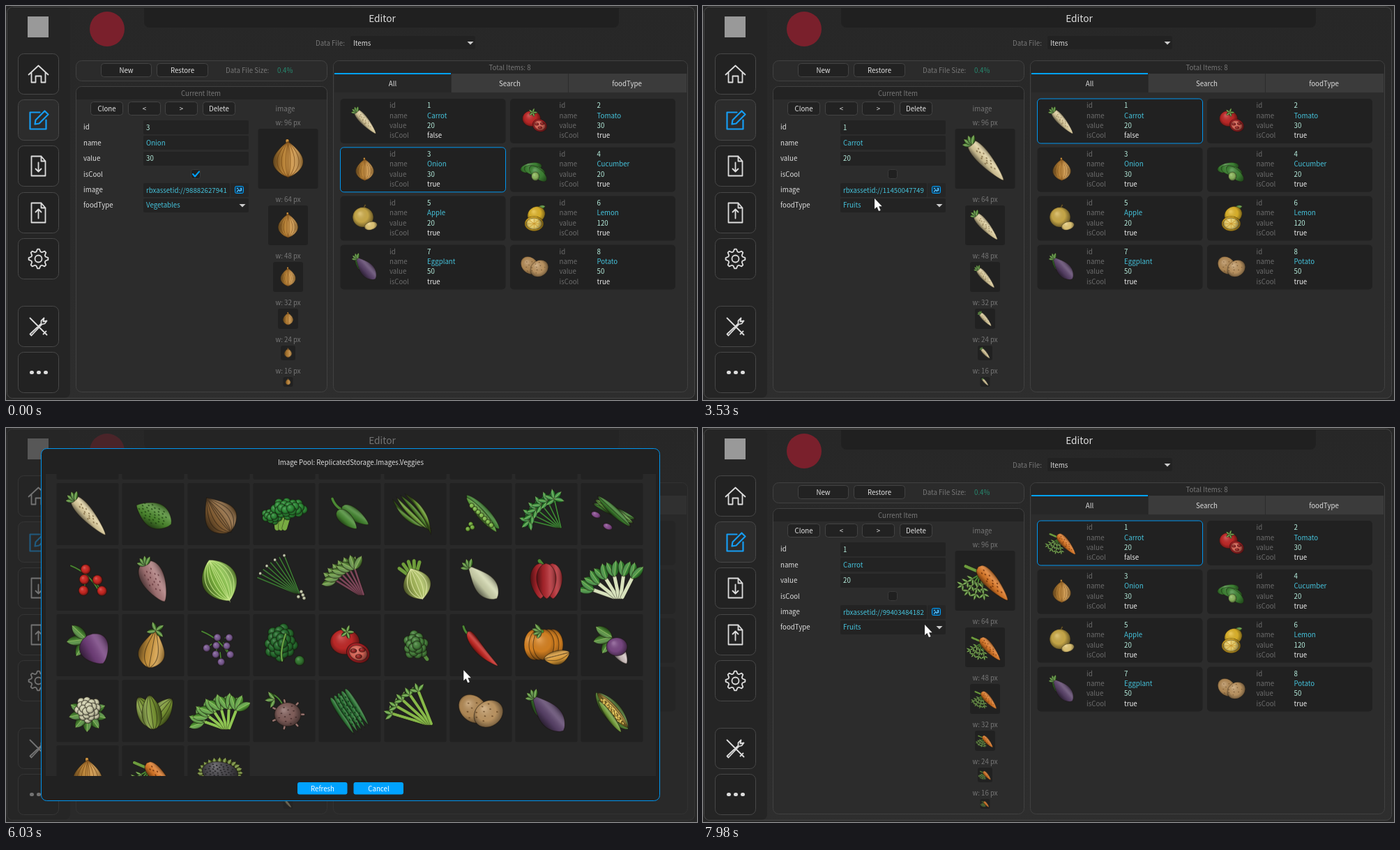
Write an HTML page with a canvas that moves like this. It is 991 px wide and 565 px high and loops after 8 s.

```html
<!DOCTYPE html>
<html lang="en">
<head>
<meta charset="utf-8">
<title>Editor</title>
<style>
html, body { margin: 0; width: 100%; height: 100%; overflow: hidden; background: #2a2a2a; }
canvas { display: block; }
</style>
</head>
<body>
<canvas id="stage" width="991" height="565"></canvas>
<script>
const stage = document.getElementById('stage').getContext('2d');
stage.imageSmoothingQuality = 'high';
let g = stage;
const BLUE = '#00a2ff', GREEN = '#4b8a34', DARK = 'rgba(20,15,10,.55)', PALE = 'rgba(205,230,140,.55)';

// ---- vegetable shapes, in pixels around the cell centre ----
function shade(path, col, light, stops) {
  stops.forEach((c, i) => light.addColorStop(i / (stops.length - 1), c));
  for (const fill of [col, light]) { g.fillStyle = fill; g.fill(path); }
  g.strokeStyle = DARK;
  g.lineWidth = 1;
  g.stroke(path);
}
function oval(col, x, y, rx, ry = rx, a = 0) {
  const p = new Path2D(), r = Math.max(rx, ry);
  p.ellipse(x, y, rx, ry, a, 0, 7);
  shade(p, col, g.createRadialGradient(x - r * .3, y - r * .35, r * .1, x, y, r * 1.15),
    ['rgba(255,255,255,.2)', 'rgba(0,0,0,.05)', 'rgba(0,0,0,.6)']);
}
// tapered body along angle a; k < 1 is widest near its start, k > 1 near its end
function body(col, x, y, len, w, a, { k = 1, bend = 0, ribs = 0, rib = DARK } = {}) {
  const side = (p, f) => {
    for (let i = 0; i <= 30; i++) {
      const u = (f < 0 ? 30 - i : i) / 30;
      p.lineTo((u - .5) * len, f * w * Math.sin(Math.PI * u ** k) ** .7 + bend * Math.sin(Math.PI * u));
    }
  };
  g.save();
  g.translate(x, y);
  g.rotate(a);
  const p = new Path2D(), lines = new Path2D();
  side(p, 1);
  side(p, -1);
  p.closePath();
  shade(p, col, g.createLinearGradient(0, bend - w, 0, bend + w),
    ['rgba(0,0,0,.4)', 'rgba(255,255,255,.15)', 'rgba(0,0,0,.1)', 'rgba(0,0,0,.55)']);
  for (let i = 1; i <= ribs; i++) {
    lines.moveTo(-len / 2, 0);
    side(lines, 2 * i / (ribs + 1) - 1);
  }
  g.strokeStyle = rib;
  g.stroke(lines);
  g.restore();
}
const leaf = (col, x, y, len, w, a) =>
  body(col, x + len / 2 * Math.cos(a), y + len / 2 * Math.sin(a), len, w, a, { ribs: 1, rib: PALE });
function line(col, w, x0, y0, x1, y1, sag = 0) {
  const p = new Path2D();
  p.moveTo(x0, y0);
  p.quadraticCurveTo((x0 + x1) / 2 + sag, (y0 + y1) / 2 - sag, x1, y1);
  g.lineCap = 'round';
  if (w > 1.5) { g.strokeStyle = DARK; g.lineWidth = w + 1.4; g.stroke(p); }
  g.strokeStyle = col; g.lineWidth = w; g.stroke(p);
}
function fan(n, from, to, draw) {
  for (let i = 0; i < n; i++) draw(from + (to - from) * i / (n - 1), i);
}
// n points spread evenly over an ellipse
function spread(n, x, y, rx, ry, a, draw) {
  for (let i = n - 1; i >= 0; i--) {
    const r = Math.sqrt((i + .5) / n), u = r * rx * Math.cos(i * 2.4), v = r * ry * Math.sin(i * 2.4);
    draw(x + u * Math.cos(a) - v * Math.sin(a), y + u * Math.sin(a) + v * Math.cos(a), i);
  }
}
const cluster = (col, n, x, y, rx, ry, r) => spread(n, x, y, rx, ry, 0, (u, v) => oval(col, u, v, r));
const dots = (col, n, rx, ry, a = .85, x = 0, y = 0) => spread(n, x, y, rx, ry, a, (u, v) => {
  g.fillStyle = col;
  g.beginPath(); g.ellipse(u, v, 1.4, .9, a, 0, 7); g.fill();
});
const tuft = (x, y, len, a, n = 4, turn = 1, col = GREEN) =>
  fan(n, a - turn, a + turn, b => leaf(col, x, y, len, len / 4, b));
// tapered root pointing down right, leaves at its head
function root(col, len, w, k, a = .85, col2 = GREEN) {
  const d = len * .42;
  body(col, 2, 3, len, w, a, { k });
  tuft(2 - d * Math.cos(a), 3 - d * Math.sin(a), 13, a + Math.PI, 4, .9, col2);
}
// stems fanning up from a base at the lower right, each with its own tip
function bunch(n, a, turn, len, w, col, tip) {
  fan(n, a - turn / 2, a + turn / 2, (b, i) => {
    const x0 = -27 * Math.cos(a) + (i - n / 2) * w * .5, y0 = -27 * Math.sin(a);
    const x = x0 + len * Math.cos(b), y = y0 + len * Math.sin(b);
    line(col, w, x0, y0, x, y);
    tip(x, y, b, i);
  });
}
function vine(col, n, r) {
  line(GREEN, 2, -24, -20, 16, 16, 7);
  spread(n, 2, 3, 24, 21, 3.6, (x, y) => {
    line(GREEN, 1.6, x, y, x * .6, y * .6 - 4);
    oval(col, x, y, r);
  });
}

const art = {
  parsnip() { root('#e2d2a2', 72, 10, .6); dots('rgba(90,65,30,.6)', 14, 20, 5); },
  chayote() { body('#4f8d30', 1, 1, 57, 18, .5, { k: 1.2 }); dots('rgba(20,50,10,.7)', 34, 23, 13, .5); },
  taro() { body('#8b6336', 0, 1, 60, 23, .95, { k: 1.4, ribs: 6 }); },
  broccoli() {
    fan(3, -12, 6, x => line('#78ab42', 7, x * .6 - 3, 20, x, 2));
    cluster('#2f8d38', 13, -17, 3, 12, 8, 5);
    cluster('#2f9139', 22, 6, -8, 22, 11, 6);
  },
  peppers() {
    line(GREEN, 3.5, -11, -6, -25, -22, -3);
    body('#43852f', 8, 2, 46, 9, .6, { k: .7 });
    body('#4a8d34', -4, 8, 38, 9, .75, { k: .7 });
  },
  beans() { fan(4, .65, 1, (a, i) => body(i % 2 ? '#6d9f35' : '#4f842a', i * 3 - 5, 0, 68, 3.2, a, { bend: 8 - i * 5 })); },
  peas() {
    body('#3b812c', 3, -3, 68, 8, .8);
    body('#5ea23c', 1, 1, 66, 6, .85);
    fan(7, -13, 15, v => oval('#86c44f', v, v + 1, 3.6));
    cluster('#78b53f', 3, -15, 19, 7, 5, 3.5);
  },
  parsley() { bunch(6, -2.35, 1.1, 42, 1.8, '#3d8a37', (x, y, a) => tuft(x, y, 14, a, 5, 2, '#2f9138')); },
  favas() {
    fan(3, .35, .75, (a, i) => body(i % 2 ? '#5b953b' : '#3e822f', 3, -4, 64, 6, a, { ribs: 1 }));
    for (const v of [-23, -6]) oval('#8b4f93', v, v + 24, 7, 4, .4);
  },
  cherries() { vine('#d22a24', 5, 7); },
  oca() { root('#ad7b7c', 64, 17, .65, 1.1); dots('rgba(85,40,45,.7)', 16, 20, 10, 1.1); },
  cabbage() { body('#83bd42', 1, 1, 64, 25, 1.1, { ribs: 8, rib: '#c5e588' }); },
  chives() {
    bunch(8, -2.35, .8, 58, 1.7, '#3b7a35', (x, y, a, i) => i % 2 && oval('#d0d6bb', x, y, 2.2));
    cluster('#cfd5b5', 4, 24, 22, 8, 6, 2.6);
  },
  spinach() { bunch(6, -2.25, .7, 38, 2.6, '#7d4659', (x, y, a) => tuft(x, y, 21, a, 3, .8, '#5d8f3c')); },
  fennel() {
    fan(5, -2.5, -1.2, a => line('#6f9e3b', 5, -1, 0, -3 + 25 * Math.cos(a), 27 * Math.sin(a)));
    body('#a9bd5b', 2, 6, 46, 20, 1.2, { k: 1.1, ribs: 5, rib: '#dde4a3' });
  },
  whiteEggplant() { root('#d3d8b0', 64, 15, 1.5); },
  bell() {
    line(GREEN, 5, -3, -18, -10, -27);
    for (const x of [-9, 9, 0]) body('#b3272e', x, 2, 51, 14, 1.55, { k: .8 });
  },
  pakChoi() { bunch(6, -1.95, 1.7, 30, 5, '#d8e2bd', (x, y, a) => tuft(x, y, 23, a, 2, .3, '#398d35')); },
  beet() { tuft(-2, -9, 28, 3, 3, .9); body('#75417f', 11, 6, 46, 21, 1.05, { k: .75 }); },
  squash() { body('#d39b40', -1, 4, 58, 19, 1.75, { k: 1.6, ribs: 3 }); tuft(4, -21, 13, 5, 4, 2); },
  berries() { vine('#81609a', 8, 5.3); },
  kale() {
    cluster('#27702f', 24, -5, -3, 19, 22, 7);
    line('#66a043', 2.5, -3, 22, 2, -16, -6);
    oval('#367c33', 22, 22, 7);
  },
  tomato() {
    oval('#c32a29', -7, -5, 21, 18);
    tuft(-4, -19, 10, 0, 5, 2.5);
    oval('#b22227', 12, 11, 17, 14, .4);
    oval('#e26b5c', 12, 11, 13.5, 10.5, .4);
    fan(3, -.6, 3.5, a => oval('#9d2524', 12 + 7 * Math.cos(a), 10 + 6 * Math.sin(a), 4.5, 3));
  },
  artichoke() {
    line('#568b3d', 5, 8, 8, 17, 20);
    cluster('#4b8740', 17, 0, 0, 14, 16, 6.5);
  },
  chili() { line(GREEN, 3, -17, -15, -25, -27, -2); body('#c72823', 3, 5, 66, 7, .85, { k: .6, bend: 4 }); },
  pumpkin() {
    for (const x of [-16, 10, -9, 4, -3]) oval('#da8422', x - 1, -1, 15, 22);
    line(GREEN, 4, -6, -20, -13, -25);
    tuft(-8, -21, 12, 3);
    body('#e7a33a', 15, 15, 38, 10, -.25, { bend: 3, ribs: 2 });
  },
  turnip() {
    tuft(0, -12, 27, 2.9, 3, .8);
    body('#d6c8c6', 12, 12, 34, 9, 1, { k: .7 });
    oval('#7c4a86', 7, 2, 15, 13);
  },
  cauliflower() {
    tuft(0, 3, 27, 1.6, 7, 2);
    cluster('#d9d8b6', 21, 1, -2, 16, 15, 5.4);
  },
  bamboo() { for (const a of [-2.1, -.9, -1.7]) body('#7e9c35', 26 * Math.cos(a) * .7, 2, 50, 14, a, { k: .8, ribs: 3 }); },
  lettuce() { bunch(6, -2, 1.6, 27, 4, '#8fc653', (x, y, a) => tuft(x, y, 23, a, 3, .7, '#57a238')); },
  spiky() {
    line(GREEN, 2, -2, -8, -17, -24, 3);
    tuft(-14, -17, 13, 3, 3);
    fan(7, 0, 5.4, a => line('#9a7570', 2.5, 5, 5, 5 + 23 * Math.cos(a), 5 + 21 * Math.sin(a)));
    oval('#85625e', 5, 5, 19, 17);
    dots('rgba(50,28,28,.7)', 12, 15, 14, 0, 5, 5);
  },
  asparagus() {
    fan(5, -11, 10, x => body('#2f7a38', x, -x * .6, 62, 4, 1, { k: .7 }));
    dots('#123f1c', 45, 29, 11, 1);
  },
  celery() { bunch(5, -2.4, .9, 50, 4, '#87b949', (x, y, a) => tuft(x, y, 12, a, 3, 1, '#549b39')); },
  potato() {
    oval('#b78e59', -11, -3, 23, 18, .75);
    oval('#c29a66', 11, 4, 22, 18, -.6);
    dots('rgba(85,55,25,.7)', 15, 25, 16, .2);
  },
  eggplant() { leaf('#3c762f', -21, -25, 39, 7, 1.2); root('#5d456d', 68, 16, 1.4); },
  corn() {
    body('#568435', 0, 0, 70, 13, .85);
    body('#c79f34', 1, -1, 66, 7, .85, { ribs: 4 });
    dots('#eace65', 38, 25, 4, .85);
    body('#78a33d', -3, 8, 56, 5, .95);
  },
  onion() { line('#cd923f', 4, 0, -17, -1, -25); body('#cd923f', 0, 1, 49, 21, 1.57, { k: 1.2, ribs: 6, rib: 'rgba(100,55,10,.6)' }); },
  carrot() {
    line('#6d9d3e', 4, -6, -11, -27, -20);
    fan(4, 1.4, 2.6, a => {
      line(GREEN, 2, -7, -9, -7 + 28 * Math.cos(a), -9 + 28 * Math.sin(a));
      fan(3, 12, 28, r => tuft(-7 + r * Math.cos(a), -9 + r * Math.sin(a), 8, a, 3));
    });
    body('#e07b28', 11, 4, 62, 10, .85, { k: .6 });
    dots('rgba(95,38,5,.75)', 14, 22, 6, .85, 8, 1);
  },
  sunflower() {
    line('#539244', 8, -9, 22, -3, 8);
    fan(24, 0, 6, a => leaf('#637c2e', 2 + 24 * Math.cos(a), -5 + 14 * Math.sin(a), 8, 3.5, a));
    oval('#4d4b50', 2, -6, 26, 15, .15);
    dots('#272629', 45, 23, 12, .15, 2, -6);
  },
  cucumber() {
    fan(3, -.2, .7, (a, i) => oval('#3f8635', i * 8 - 8, i * 7 - 4, 25, 11, a));
    oval('#92bd62', 2, 16, 9, 10);
  },
  apple() {
    line('#625027', 3, -4, -20, 1, -30);
    oval('#cfae4b', -4, -2, 24, 23);
    oval('#e7cc7a', 14, 18, 15, 9, -.3);
  },
  lemon() {
    leaf(GREEN, 7, -22, 18, 5, -.3);
    oval('#e2b72c', 4, -8, 21, 18, -.5);
    oval('#d9aa25', -1, 13, 22, 17);
    oval('#f0d772', -1, 13, 18, 13);
    fan(8, 0, 5.5, a => line('#c9962c', 1.3, -1, 13, -1 + 15 * Math.cos(a), 13 + 11 * Math.sin(a)));
  }
};
const cache = {};
function sprite(name, x, y, s) {
  if (!cache[name]) {
    const c = cache[name] = document.createElement('canvas'), outer = g;
    c.width = c.height = 180;
    g = c.getContext('2d');
    g.setTransform(2, 0, 0, 2, 90, 90);
    art[name]();
    g = outer;
  }
  g.drawImage(cache[name], x - 45 * s, y - 45 * s, 90 * s, 90 * s);
}

// ---- interface ----
const items = [
  ['Carrot', 20, false, 'parsnip'], ['Tomato', 30, true, 'tomato'], ['Onion', 30, true, 'onion'],
  ['Cucumber', 20, true, 'cucumber'], ['Apple', 20, true, 'apple'], ['Lemon', 120, true, 'lemon'],
  ['Eggplant', 50, true, 'eggplant'], ['Potato', 50, true, 'potato']];
const assets = { parsnip: '11450047749', tomato: '11450047732', onion: '988826279412', carrot: '99403484182' };
const pool = ('cucumber apple lemon lettuce squash taro kale bell artichoke ' +
  'parsnip chayote taro broccoli peppers beans peas parsley favas ' +
  'cherries oca cabbage chives spinach fennel whiteEggplant bell pakChoi ' +
  'beet squash berries kale tomato artichoke chili pumpkin turnip ' +
  'cauliflower bamboo lettuce spiky asparagus celery potato eggplant corn onion carrot sunflower').split(' ');

function box(x, y, w, h, r, fill, stroke) {
  g.beginPath();
  g.roundRect(x, y, w, h, r);
  if (fill) { g.fillStyle = fill; g.fill(); }
  if (stroke) { g.strokeStyle = stroke; g.lineWidth = 1; g.stroke(); }
}
function text(s, x, y, col = '#ddd', align = 'left', size = 9.7) {
  g.font = size + 'px "Noto Sans CJK JP","Noto Sans CJK SC","Noto Sans CJK",sans-serif';
  g.textAlign = align;
  g.fillStyle = col;
  g.fillText(s, x, Math.round(y + size * .4));
}
function button(s, x, y, w, dark) {
  box(x + .5, y + .5, w - 1, 19, 4, dark ? '#171717' : '#222', '#434343');
  text(s, x + w / 2, y + 10, '#e4e4e4', 'center');
}
function caret(x, y) {
  g.fillStyle = '#ccc';
  g.beginPath(); g.moveTo(x - 4.5, y - 2); g.lineTo(x + 4.5, y - 2); g.lineTo(x, y + 2.5); g.fill();
}
function mark(d, x, y, col, w = 1.8) {
  g.save();
  g.translate(x, y);
  g.strokeStyle = col; g.lineWidth = w; g.lineCap = g.lineJoin = 'round';
  g.stroke(new Path2D(d));
  g.restore();
}
const inside = (p, x, y, w, h) => p && p.x > x && p.x < x + w && p.y > y && p.y < y + h;

function gear() {
  let d = '';
  for (let i = 0; i < 32; i++) {
    const a = (i - .5) * Math.PI / 16, r = i % 4 < 2 ? 14 : 10.5;
    d += (i ? 'L' : 'M') + r * Math.cos(a) + ' ' + r * Math.sin(a);
  }
  return d + 'ZM5 0A5 5 0 1 1 -5 0A5 5 0 1 1 5 0';
}
const SHEET = 'M-10-14H4L10-7V14H-10ZM4-14V-7H10';
const icons = [
  'M-14 1L0-12L14 1M-10-2V12H-4V3H4V12H10V-2',
  'M2-11H-12V13H11V0M-5 6L-4 0L9-13L14-8L1 5Z',
  SHEET + 'M0-5V8M-4 4L0 8L4 4', SHEET + 'M0 8V-5M-4-1L0-5L4-1', gear(),
  'M-12-12L12 12M7 11L11 7M12-8L7-7L8-12L4-8V-4L-12 11L-10 13L5-3L9-4Z',
  'M-10 0H-9M0 0H1M10 0H11'];

function sidebar() {
  box(2, 2, 90, 560, 8, '#252525');
  box(31, 15, 30, 30, 0, '#999');
  box(120, 8, 50, 50, 25, '#7a202c');
  icons.forEach((d, i) => {
    const y = 68.5 + Math.round(66.2 * i) + (i > 4 ? 31 : 0), on = i == 1;
    box(17.5, y, 58, 58, 8, on ? '#2c2c2c' : '#222', '#484848');
    mark(d, 46.5, y + 29, on ? '#169df3' : '#ddd', i == 6 ? 5 : on ? 2.2 : 1.8);
  });
}

function form(n, pic, hot) {
  const [name, value, cool] = items[n - 1];
  box(100.5, 78.5, 360, 29, 8, '#2b2b2b', '#414141');
  button('New', 136, 82, 73);
  button('Restore', 216, 82, 74);
  text('Data File Size:', 315, 92, '#777');
  text('0.4%', 389, 92, '#268a70');
  box(100.5, 115.5, 360, 438, 8, '#2c2c2c', '#414141');
  box(101, 116, 359, 18, [8, 8, 0, 0], '#232323');
  text('Current Item', 279.5, 125, '#777', 'center');
  ['Clone', '<', '>', 'Delete'].forEach((s, i) => button(s, 121 + Math.round(i * 53.7), 137, 47, hot && i == 1));
  ['id', 'name', 'value', 'isCool', 'image', 'foodType'].forEach((s, i) => {
    text(s, 111, 173.5 + i * 22.4);
    if (i != 3) box(197, 164 + Math.round(i * 22.4), i == 4 ? 124 : 151, 20, 2, '#232323');
  });
  text(n, 201, 174, '#b8f0e0');
  text(name, 201, 196, '#45c3dc');
  text(value, 201, 218, '#b8f0e0');
  box(265.5, 234.5, 13, 13, 3, '#202020', '#3a3a3a');
  if (cool) mark('M-4 0L-1 3.5L5-3.5', 272, 241, BLUE, 2);
  box(322, 254, 26, 20, 2, '#262626');
  g.save();
  g.beginPath(); g.rect(197, 254, 120, 20); g.clip();
  text('rbxassetid://' + assets[pic], 201, 264.5, '#45c3dc');
  g.restore();
  box(328.5, 258.5, 12, 10, 2, '#123b58', BLUE);
  mark('M-3 3L-1 0L1 2L3-1M-3-2H-2M2-2H3V1', 334.5, 263.5, '#5cc4ff', 1.3);
  text(n == 1 ? 'Fruits' : 'Vegetables', 201, 285.5, '#45c3dc');
  caret(339, 286);
  text('image', 400.5, 147, '#777', 'center');
  let y = 176;
  for (const px of [96, 64, 48, 32, 24, 16]) {
    const w = Math.round(px * .895);
    text('w: ' + px + ' px', 404.5, y - 8.5, '#777', 'center');
    box(404.5 - w / 2, y, w, w, 3, '#212121');
    sprite(pic, 404.5, y + w / 2, w / 83);
    y += w + 24;
  }
}

function list(n, firstPic, mouse) {
  box(469.5, 78.5, 508, 475, 8, '#2c2c2c', '#414141');
  box(470, 79, 507, 18, [8, 8, 0, 0], '#262626');
  text('Total Items: 8', 722.5, 88, '#777', 'center');
  ['All', 'Search', 'foodType'].forEach((s, i) => {
    const x = 471 + i * 168;
    box(x, 97, i == 2 ? 169 : 167, 27, 0, i ? '#3b3b3b' : '#272727');
    text(s, x + 83.5, 111, '#ddd', 'center');
  });
  box(471, 96, 167, 2, 0, BLUE);
  items.forEach(([name, value, cool, pic], i) => {
    const x = 479 + i % 2 * 243.5, y = 132.5 + (i >> 1) * 69.8;
    box(x + .5, y + .5, 237, 64, 5, inside(mouse, x, y, 238, 64) ? '#1b1b1b' : '#212121', i == n - 1 ? '#0096f0' : '');
    sprite(i ? pic : firstPic, x + 35.5, y + 32, .62);
    [['id', i + 1, '#b8f0e0'], ['name', name, '#45c3dc'], ['value', value, '#b8f0e0'], ['isCool', cool, '#eee']].forEach(([k, v, col], j) => {
      text(k, x + 71, y + 10 + j * 14.3, '#6c6c6c');
      text(v, x + 125, y + 10 + j * 14.3, col);
    });
  });
}

function dialog(scroll, mouse) {
  box(0, 0, 991, 565, 0, 'rgba(40,40,40,.58)');
  box(50.5, 29.5, 887, 505, 8, '#212121', '#0095ee');
  text('Image Pool: ReplicatedStorage.Images.Veggies', 494.5, 49, '#ddd', 'center');
  g.save();
  g.beginPath(); g.rect(57, 66, 875, 433); g.clip();
  box(57, 66, 875, 433, 0, '#292929');
  pool.forEach((pic, i) => {
    const x = 72.5 + i % 9 * 94, y = 73 + Math.floor(i / 9) * 94.1 - scroll;
    box(x, y, 89, 89, 2, '#212121');
    if (inside(mouse, x, y, 89, 89)) box(x + 1, y + 1, 87, 87, 2, '#141414');
    sprite(pic, x + 44.5, y + 44.5, 1);
  });
  g.restore();
  ['Refresh', 'Cancel'].forEach((s, i) => {
    const x = 418 + i * 80.5;
    box(x, 508, 71.5, 17.5, 3, BLUE);
    text(s, x + 36, 517, '#fff', 'center');
  });
}

// ---- motion ----
const SCROLL_START = 5490, SCROLL_END = 142.5, SCROLL_SPEED = .163;
// pointer stops: time, x, y
const stops = [[370, 850, 240], [1150, 201, 157], [1400, 195, 151], [2620, 195, 151], [3530, 246, 276],
  [4240, 310, 287], [4960, 341, 261], [5490, 341, 261], [6030, 657, 347], [6570, 274, 430],
  [6880, 232, 436], [7050, 232, 436], [7600, 386, 340], [7980, 318, 282]];
// each click: pressed at, takes effect at
const clicks = [[1590, 1660], [2040, 2120], [4960, 5160], [6880, 7000]];

function pointerAt(t) {
  if (t < stops[0][0]) return null;
  const i = stops.findIndex(s => s[0] > t);
  if (i < 0) return { x: stops.at(-1)[1], y: stops.at(-1)[2] };
  const [t0, x0, y0] = stops[i - 1], [t1, x1, y1] = stops[i], u = (t - t0) / (t1 - t0);
  return { x: x0 + (x1 - x0) * u, y: y0 + (y1 - y0) * u };
}

function pointer({ x, y }, pressed) {
  if (pressed) box(x - 11, y - 11, 22, 22, 11, 'rgba(222,208,28,.8)');
  const p = new Path2D('M0 0V15L3.4 12L6 18L8.6 17L6.1 11.2H10.6Z');
  g.save();
  g.translate(x, y);
  g.strokeStyle = '#222'; g.lineWidth = 1.2; g.stroke(p);
  g.fillStyle = '#fff'; g.fill(p);
  g.restore();
}

function draw(t) {
  const done = clicks.filter(c => t >= c[1]).length;
  const pressed = clicks.some(([a, b]) => t >= a && t < b);
  const n = Math.max(1, 3 - done), open = done == 3;
  const firstPic = done < 4 ? 'parsnip' : 'carrot';
  const mouse = pointerAt(t);
  const scroll = Math.min(SCROLL_END, Math.max(0, (t - SCROLL_START) * SCROLL_SPEED));
  const back = g.createLinearGradient(0, 0, 0, 565);
  back.addColorStop(0, '#272727');
  back.addColorStop(1, '#2e2e2e');
  box(0, 0, 991, 565, 0, '#272727');
  box(1.5, 1.5, 986, 561, 8, back, '#474747');
  sidebar();
  box(198, 3, 681, 28, [0, 0, 8, 8], '#202020');
  text('Editor', 539.5, 17.5, '#ddd', 'center', 13.7);
  text('Data File:', 444, 53, '#777');
  box(494, 43, 179, 19, 2, '#222');
  text('Items', 498, 53);
  caret(666, 53);
  form(n, n > 1 ? items[n - 1][3] : firstPic, done < 2 && inside(mouse, 175, 137, 47, 20));
  list(n, firstPic, !open && mouse);
  if (open) dialog(scroll, scroll == SCROLL_END && mouse);
  if (mouse) pointer(mouse, pressed);
}

const start = performance.now();
function tick() {
  draw((performance.now() - start) % 8000);
  requestAnimationFrame(tick);
}
tick();
</script>
</body>
</html>
```
